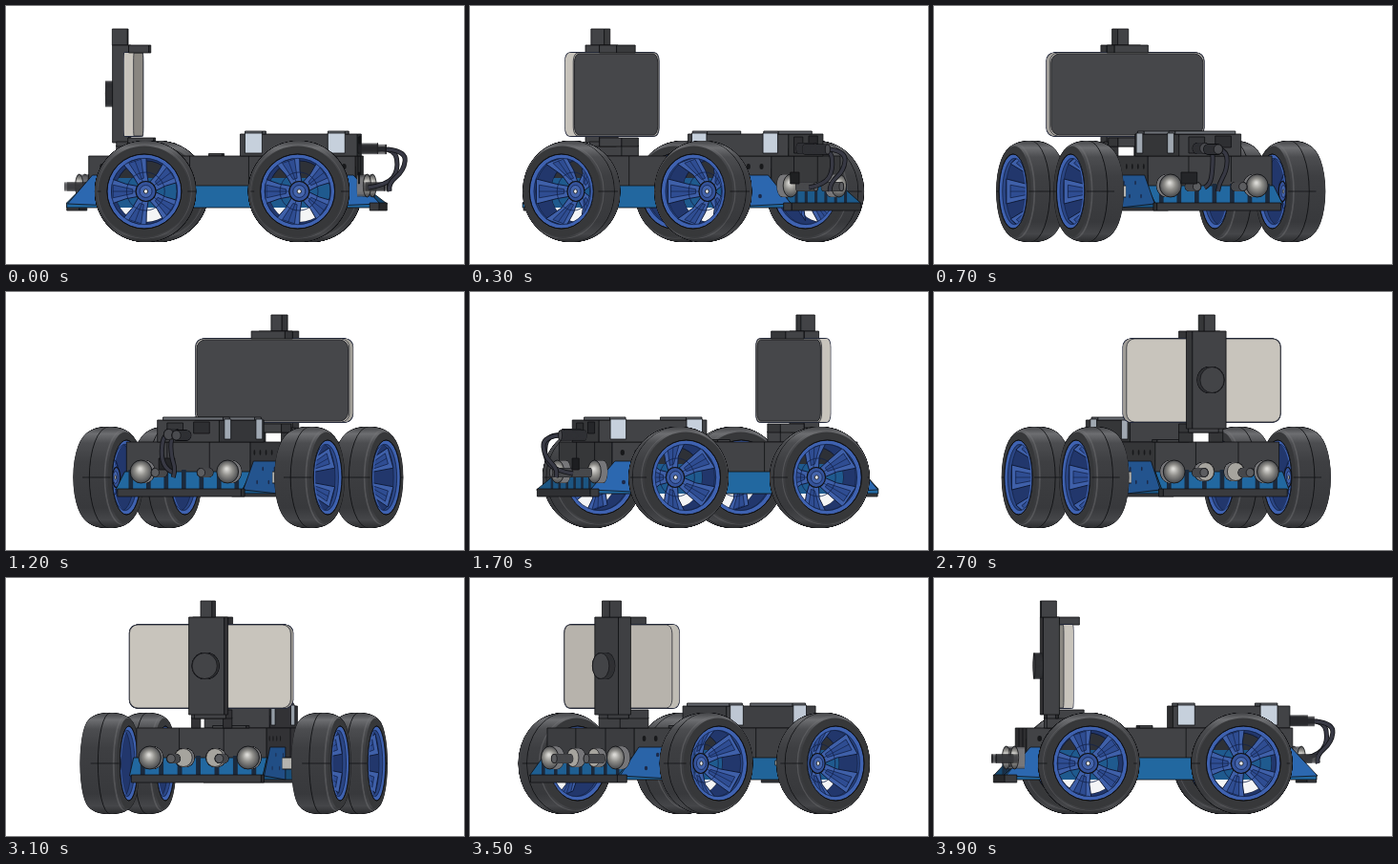
An HTML page with a canvas that plays this animation: 480 px wide and 270 px high, repeating every 4 s.

```html
<!DOCTYPE html>
<html lang="en">
<head>
<meta charset="utf-8">
<title>Rover turntable</title>
<style>
html, body { margin: 0; width: 100%; height: 100%; overflow: hidden; background: #fff; }
canvas { display: block; width: 480px; height: 270px; }
</style>
</head>
<body>
<canvas id="stage" width="480" height="270"></canvas>
<script>
const ctx = document.getElementById('stage').getContext('2d');
const TAU = Math.PI * 2;
const AXIS = 240.5;
const AXLE_Y = 194, TRACK = 114, WHEELS_X = [-88, 73];
const DARK = [66, 67, 70], BLUE = [34, 104, 160], LIGHT = [200, 196, 188], STRAP = [198, 208, 220];
const INK = '#101114';
// The turntable runs slightly unevenly: [step, degrees].
const TURN = [[0, 3.3], [7, 68], [17, 156.7], [23, 207.3], [27, 248], [35, 319.5], [39, 355.3]];
let c = 1, s = 0;

function turnAt(step) {
  const i = TURN.findIndex(key => key[0] > step);
  const [[t0, a0], [t1, a1]] = TURN.slice(i < 0 ? -2 : i - 1);
  return a0 + (a1 - a0) * (step - t0) / (t1 - t0);
}

// Level orthographic view: x runs front to rear, z towards the near side.
const px = (x, z) => AXIS + x * c - z * s;
const shade = (rgb, facing) => {
  const k = 0.66 + 0.34 * Math.min(1, Math.abs(facing) * 1.15);
  return `rgb(${rgb.map(v => Math.round(v * k)).join()})`;
};

function paint(fill, line = INK, width = 0.8) {
  if (fill) { ctx.fillStyle = fill; ctx.fill(); }
  if (line) { ctx.strokeStyle = line; ctx.lineWidth = width; ctx.stroke(); }
}

function poly(points, fill, line, width) {
  ctx.beginPath();
  points.forEach(([x, y]) => ctx.lineTo(x, y));
  ctx.closePath();
  paint(fill, line, width);
}

function segment(x0, y0, x1, y1, color = INK, width = 0.8) {
  ctx.beginPath();
  ctx.moveTo(x0, y0);
  ctx.lineTo(x1, y1);
  paint(null, color, width);
}

function oval(x, y, rx, ry, fill, line = null, width) {
  ctx.beginPath();
  ctx.ellipse(x, y, Math.abs(rx), ry, 0, 0, TAU);
  paint(fill, line, width);
}

// Rectangle in a plane of constant z (side) or constant x (end).
function sideFace(x0, x1, y0, y1, z, rgb) {
  const a = px(x0, z), b = px(x1, z);
  poly([[a, y0], [b, y0], [b, y1], [a, y1]], shade(rgb, c));
}
function endFace(x, z0, z1, y0, y1, rgb) {
  const a = px(x, z0), b = px(x, z1);
  poly([[a, y0], [b, y0], [b, y1], [a, y1]], shade(rgb, s));
}
function box(x0, x1, y0, y1, half, rgb = DARK) {
  sideFace(x0, x1, y0, y1, Math.sign(c) * half, rgb);
  endFace(s > 0 ? x1 : x0, -half, half, y0, y1, rgb);
}

// Cylinder along x, stacked from far to near.
function tube(x0, x1, y, z, r, body, cap = body) {
  const [far, near] = (x1 > x0) === (s > 0) ? [x0, x1] : [x1, x0];
  const n = Math.ceil(Math.abs(x1 - x0));
  for (const grow of [0.6, 0]) {
    for (let i = 0; i <= n; i++) {
      oval(px(far + (near - far) * i / n, z), y, (r + grow) * s, r + grow, grow ? INK : body);
    }
  }
  oval(px(near, z), y, r * s, r, cap, INK, 0.7);
}

function dome(x, y, z, r) {
  const cx = px(x, z), rx = r * (0.3 + 0.7 * Math.abs(s));
  const g = ctx.createRadialGradient(cx - 1, y - 3, 1, cx, y, r);
  g.addColorStop(0, '#d9d8d4');
  g.addColorStop(0.45, '#8f8e8a');
  g.addColorStop(1, '#47484b');
  oval(cx, y, rx, r, g, INK, 0.8);
}

function phone() {
  const [far, near] = s > 0 ? [-112, -102] : [-102, -112];
  const slab = (x, grow) => {
    const w = 87 * Math.abs(s) + grow;
    ctx.beginPath();
    ctx.roundRect(px(x, 0) - w, 49 - grow, 2 * w, 87 + 2 * grow, [{ x: 9 * Math.abs(s), y: 9 }]);
  };
  for (const grow of [0.6, 0]) {
    for (let i = 0; i <= 10; i++) {
      slab(far + (near - far) * i / 10, grow);
      paint(grow ? '#20263a' : shade(LIGHT, c), null);
    }
  }
  slab(near, 0);
  paint(shade(LIGHT, s), '#2a2c34', 0.8);
  if (s > 0.1) {
    slab(near, -1.2);
    paint('#46474a', '#1c1d22', 0.9);
  }
}

function chassis() {
  const side = Math.sign(c);
  box(-150, 130, 157, 191, 70);
  const end = s > 0 ? 130 : -150;
  for (const z of [-24, 24]) segment(px(end, z), 157, px(end, z), 184);
  for (const x of [-44, 18]) segment(px(x, 70 * side), 157, px(x, 70 * side), 188);

  const tip = s > 0 ? 155 : -173, top = s > 0 ? 130 : -155;
  poly([[px(top, -72), 188], [px(top, 72), 188], [px(tip, 72), 207], [px(tip, -72), 207]],
    shade(BLUE, s));
  for (let z = -60; z <= 60; z += 20) {
    const mid = (top + tip) / 2;
    segment(px(mid, z), 186, px(mid, z), 206, '#1c2a3c', 1 + 4 * Math.abs(s));
  }
  const outline = [[-173, 211], [-173, 206], [-155, 188], [130, 188], [155, 206], [155, 211]];
  poly(outline.map(([x, y]) => [px(x, 72 * side), y]), shade(BLUE, c));
  for (const bracket of [
    [[60, 177], [128, 177], [156, 207], [60, 211]],
    [[-78, 177], [-146, 177], [-172, 207], [-78, 211]]
  ]) {
    poly(bracket.map(([x, y]) => [px(x, 73 * side), y]), shade([44, 104, 176], c));
    for (let i = 0; i < 4; i++) {
      const x = bracket[0][0] + Math.sign(bracket[0][0]) * (10 + i * 16);
      oval(px(x, 73 * side), 185 + (i % 2) * 14, 2.2 * c, 2.2, '#1c2a4a');
      oval(px(x, 70 * side), 168, 2.4 * c, 3, '#18191b');
    }
  }
  for (const x of [-60, 45]) sideFace(x - 3, x + 3, 191, 196, 73 * side, LIGHT);
}

function battery() {
  box(7, 130, 134, 157, 35);
  for (const x of [12, 99]) {
    box(x, x + 18, 131, 134, 34, [110, 114, 120]);
    sideFace(x, x + 18, 133, 154, 35.5 * Math.sign(c), STRAP);
  }
  if (s > 0) {
    endFace(130, -24, -6, 136, 148, [46, 47, 50]);
    endFace(130, 6, 24, 137, 154, [54, 55, 58]);
  }
}

// Two plates carry the mast foot, leaving daylight between them.
function foot() {
  const side = Math.sign(c);
  for (const z of [-17 * side, 17 * side]) sideFace(-124, -85, 146, 157, z, DARK);
  box(-124, -112, 142, 147, 17);
  box(-112, -85, 138, 147, 17);
}

function sensors(dir) {
  const base = dir < 0 ? -151 : 131;
  const spots = dir < 0 ? [-53, -17, 17, 53] : [-49, 49];
  spots.sort((a, b) => (a - b) * c);
  for (const z of spots) {
    const outer = Math.abs(z) > 20;
    tube(base, base + dir * 9, 188, z, outer ? 11.5 : 9.5, '#77777a', '#a6a49e');
    if (outer) dome(base + dir * 10, 188, z, 12);
  }
  for (const z of [-26, 26]) tube(base + dir * 5, base + dir * 27, 189, z, 4.5, '#48494c', '#5c5d60');
}

function cable(points) {
  const flat = points.map(([x, y, z]) => [px(x, z), y]);
  ctx.beginPath();
  ctx.moveTo(...flat[0]);
  for (let i = 1; i < flat.length - 1; i++) {
    const [x, y] = flat[i], [u, v] = flat[i + 1];
    const last = i === flat.length - 2;
    ctx.quadraticCurveTo(x, y, last ? u : (x + u) / 2, last ? v : (y + v) / 2);
  }
  paint(null, INK, 5);
  paint(null, '#383944', 3.4);
}

function wiring() {
  if (s > 0) endFace(131, 15, 33, 174, 186, [36, 37, 40]);
  cable([[150, 150, 14], [168, 148, 12], [172, 172, 14], [160, 187, 12], [140, 190, 10]]);
  cable([[160, 150, 2], [179, 152, 0], [177, 172, 0], [160, 186, 2], [162, 194, 4]]);
  tube(130, 150, 149, 14, 5.5, '#303135', '#4a4b4f');
  tube(130, 158, 150, 2, 5, '#303135', '#4a4b4f');
}

const bodyParts = [
  [-166, () => box(-173, -160, 206, 214, 70, [58, 59, 62])],
  [-168, () => sensors(-1)],
  [-132, () => tube(-136, -128, 92, 0, 13.5, '#303134', '#434447')],
  [-121, () => box(-129, -113, 24, 41, 6)],
  [-120, () => box(-128, -111, 41, 143, 19)],
  [-107, phone],
  [-100, () => box(-111, -90, 41, 49, 19)],
  [-99, foot],
  [-20, () => box(-27, -13, 154.5, 157, 18)],
  [-10, chassis],
  [68, battery],
  [150, () => box(145, 155, 206, 214, 70, [58, 59, 62])],
  [152, () => sensors(1)],
  [156, wiring]
];

function rim(x, side, dir) {
  const pt = (r, a, u) =>
    [px(x + side * r * Math.cos(a), side * (TRACK + u)), AXLE_Y + r * Math.sin(a)];
  const ring = (r, u, fill, line, width) =>
    oval(px(x, side * (TRACK + u)), AXLE_Y, r * c, r, fill, line, width);
  const face = dir * 20.5;

  ctx.save();
  ring(39, face, '#2b4685', INK, 1);
  ctx.clip();
  ring(35, face - dir * 6, '#22376c', '#152447', 0.8);

  // What shows through the open back of the rim.
  ctx.save();
  ring(32, -dir * 12, '#2e3137', '#101a33', 1);
  ctx.clip();
  ctx.fillStyle = '#1f5a8e';
  ctx.fillRect(0, 180, 480, 31);
  ctx.fillStyle = '#f4f5f6';
  ctx.fillRect(0, 211, 480, 40);
  ctx.restore();

  for (let i = 0; i < 5; i++) {
    const a = Math.PI + i * TAU / 5;
    const outline = [[9, -0.62, -9], [22, -0.36, -3], [37, -0.36, 14], [37, 0.36, 14], [22, 0.36, -3], [9, 0.62, -9]];
    poly(outline.map(([r, d, u]) => pt(r, a + d, u)), '#3f60a9', '#101c3a', 1);
    poly([pt(14, a - 0.16, -8), pt(34, a - 0.2, 10), pt(34, a + 0.2, 10), pt(14, a + 0.16, -8)],
      '#2f4d92', '#14234a', 0.8);
    segment(...pt(10, a, -9), ...pt(34, a, 10), '#14234a', 0.7);
  }
  ring(36.8, face - dir, null, '#3f62b0', 3.6);
  ring(34.6, face - dir * 2, null, '#152447', 0.8);
  ring(20, -4, null, '#14234a', 0.8);
  ring(10.5, -9, '#35539a', INK, 1.2);
  ring(6.5, -8, '#4565ac', '#14234a', 0.8);
  ring(2.2, -8, '#eef0f2', INK, 0.8);
  ctx.restore();
  ring(39, face, null, INK, 0.9);
}

const rubber = ctx.createLinearGradient(0, 141, 0, 247);
[[0, '#434447'], [0.07, '#6d6e71'], [0.16, '#4c4d50'], [0.35, '#3e3f42'], [0.8, '#38393c'], [0.92, '#454649'], [1, '#2b2c2e']]
  .forEach(stop => rubber.addColorStop(...stop));
const tireRadius = u => 39 + 13.5 * Math.pow(Math.max(0, 1 - Math.pow(Math.abs(u) / 23, 2.3)), 1 / 2.3);

function wheel(x, side) {
  const dir = side * Math.sign(c);
  const at = (u, dx = 0) => px(x + dx, side * (TRACK + u));
  segment(px(x, side * 72), AXLE_Y, at(-18), AXLE_Y, INK, 13);
  segment(px(x, side * 72), AXLE_Y, at(-18), AXLE_Y, '#b5b4af', 11);

  for (const grow of [0.6, 0]) {
    for (let u = -21; u <= 21; u += 1) {
      const r = tireRadius(u) + grow;
      oval(at(u * dir), AXLE_Y, r * c, r, grow ? INK : u > 18 ? '#37383a' : rubber);
      if (!grow && u === 0) oval(at(0), AXLE_Y, r * c, r, null, INK, 0.9);
      if (!grow && u === 16) oval(at(u * dir), AXLE_Y, (r - 1) * c, r - 1, null, 'rgba(120,121,124,0.4)', 2);
    }
  }
  // Mould seam at axle height.
  for (const edge of [-1, 1]) {
    ctx.beginPath();
    for (let u = edge * s > 0 ? -8 : 16; u <= 21; u++) {
      ctx.lineTo(at(u * dir, edge * Math.sign(c) * Math.sign(c) * tireRadius(u)), AXLE_Y);
    }
    paint(null, INK, 0.8);
  }
  rim(x, side, dir);
}

function draw(step) {
  const angle = turnAt(step) * Math.PI / 180;
  c = Math.cos(angle);
  s = Math.sin(angle);
  ctx.fillStyle = '#fff';
  ctx.fillRect(0, 0, 480, 270);
  ctx.lineJoin = 'round';
  const near = Math.sign(c);
  const pair = [...WHEELS_X].sort((a, b) => (a - b) * s);
  pair.forEach(x => wheel(x, -near));
  [...bodyParts].sort((a, b) => (a[0] - b[0]) * s).forEach(part => part[1]());
  pair.forEach(x => wheel(x, near));
}

function tick() {
  draw(Math.floor(performance.now() % 4000 / 100));
  requestAnimationFrame(tick);
}
tick();
</script>
</body>
</html>
```
